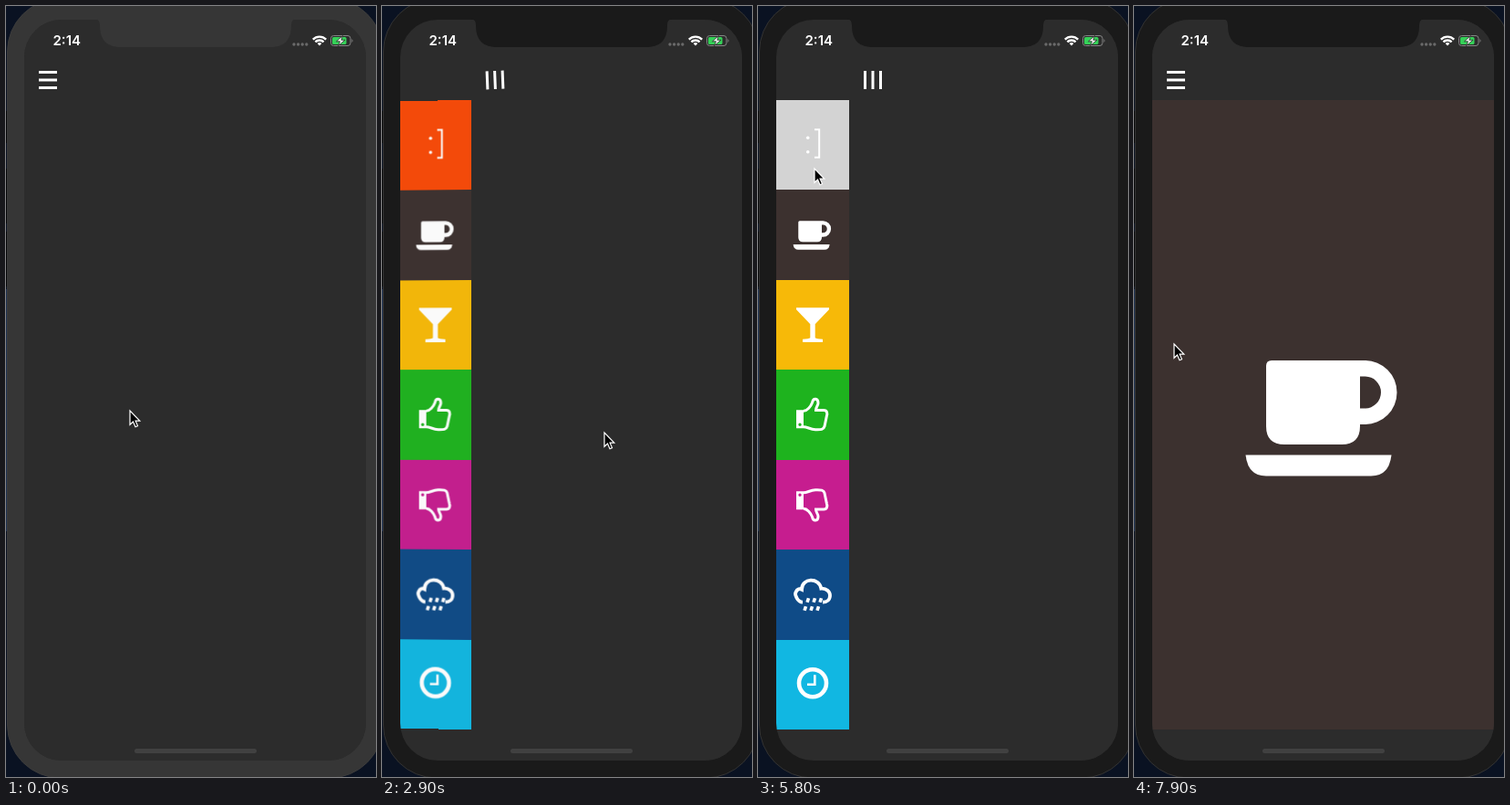
An HTML page for the animation above (8000 ms loop, 406 by 844 pixels).

```html
<!DOCTYPE html>
<html lang="en">
<head>
<meta charset="utf-8">
<title>Folding side menu</title>
<style>
html, body { margin: 0; width: 100%; height: 100%; overflow: hidden; background: #0a1222; }
body > svg, #screen, #menu, #detail, #pane { position: absolute; }
body > svg { left: 0; top: 0; width: 406px; height: 844px; }
#screen { left: 20px; top: 15px; width: 375px; height: 811px; border-radius: 41px; overflow: hidden; background: #2c2c2c; }
#menu { left: 0; top: 88px; width: 80px; height: 689px; transform-origin: 100% 50%; }
#menu div { height: calc(100% / 7); }
#menu svg { display: block; width: 80px; height: 100%; }
#detail { left: 0; top: 0; width: 375px; height: 811px; background: #2c2c2c; }
#pane { left: 0; top: 88px; width: 375px; height: 689px; }
#pane svg { position: absolute; left: 27.5px; top: 147.5px; width: 320px; height: 394px; }
.icon { fill: #fff; stroke: #fff; stroke-width: 0; }
.icon .line { fill: none; stroke-width: 3; }
</style>
</head>
<body>
<svg viewBox="0 0 406 844">
  <path d="M0 310H2V575H0Z" fill="#1d3150"/>
  <path d="M0 115H2V150H0ZM0 178H2V238H0ZM0 247H2V307H0Z" fill="#050608"/>
  <rect id="bezel" x="1.5" y="-8" width="412" height="853" rx="58"/>
</svg>
<div id="screen">
  <div id="menu"></div>
  <div id="detail"><div id="pane"></div></div>
</div>
<svg viewBox="0 0 406 844">
  <path id="notch" d="M98 14Q103 15 103 21C103 38 111 45 127 45H289C305 45 313 38 313 21Q313 15 318 14Z"/>
  <text x="51.5" y="43" fill="#fff" font-family="Inter, sans-serif" font-size="15" font-weight="600" textLength="auto">2:14</text>
  <path d="M316 42H331" stroke="#6a6a6a" stroke-width="3.4" stroke-linecap="round" stroke-dasharray="0 4.6"/>
  <g fill="none" stroke="#fff" stroke-width="2.3">
    <path d="M336.8 36.6A10 10 0 0 1 351.2 36.6M339.4 39.4A6.5 6.5 0 0 1 348.6 39.4"/>
    <path d="M341.6 41L344 43.6L346.4 41Q344 39.2 341.6 41Z" fill="#fff" stroke="none"/>
  </g>
  <rect x="356.5" y="32.5" width="21.5" height="11" rx="3" fill="none" stroke="#858585"/>
  <path d="M379.5 36Q381.5 38 379.5 40Z" fill="#858585"/>
  <rect x="358" y="34" width="15.5" height="8" rx="1.6" fill="#35d158"/>
  <path d="M369.5 32.5L362.5 38.8H366.5L364.5 43.6L372 37.2H367.8Z" fill="#fff" stroke="#222" stroke-width=".8"/>
  <rect x="141" y="813" width="134" height="5" rx="2.5" fill="#414141"/>
  <path id="burger" d="M-10-8.5H10M-10 0H10M-10 8.5H10" stroke="#fff" stroke-width="3"/>
  <path id="cursor" d="M0 0V15.3L3.5 12L6 17.7L8.5 16.6L6.1 11.2H10.8Z" fill="#000" stroke="#fff" stroke-width="1.2"/>
</svg>
<script>
const $ = id => document.getElementById(id);
const thumb = `<path d="M-18-5H-10V15H-18ZM-14 9.3A1.7 1.7 0 0 0-14 12.7A1.7 1.7 0 0 0-14 9.3Z"/>
  <path class="line" d="M-10-4C-6-4-2-9-.5-13C.5-18.5 6-18 6-12.5C6-10 3.5-8 3.5-4.7H12C16-4.7 16.4-1 15.3 2L13 13C12 17 8 16.5 3 16.5C-3 16-6 13.5-10 13.5"/>`;
const items = [
  ["#f84a08", `<circle cx="-5.3" cy="-8" r="1.8"/><circle cx="-5.3" cy="7.5" r="1.8"/>
    <path class="line" style="stroke-width:2" d="M2-17H7.2V13.5H2"/>`],
  ["#3c312f", `<g transform="scale(.25)"><path d="M-57-60H45.5A35 35 0 0 1 45.5 10H40V12Q40 32 20 32H-43Q-63 32-63 12V-54Q-63-60-57-60Z
    M40-42.5V-7.5H45.5A17.5 17.5 0 0 0 45.5-42.5Z" fill-rule="evenodd"/>
    <path d="M-85.5 43.5H74.5Q72 66.5 52 66.5H-63Q-83 66.5-85.5 43.5Z"/></g>`],
  ["#f7b908", `<path d="M-18-19H18V-17L2.7-1V14Q4 15.3 11 15.5V18.7H-11V15.5Q-4 15.3-2.7 14V-1L-18-17Z"/>`],
  ["#1eb31e", thumb],
  ["#c61d8f", `<g transform="scale(1 -1)">${thumb}</g>`],
  ["#0f4b87", `<path class="line" style="stroke-width:3.8" d="M-11 8.5C-17 8.5-20-.5-18.5-2.5C-17-6.5-14-6.5-12-5.5C-12-18.5 7-19 9.3-6.5C15-7 19-3 19 1C19 6 15 8.5 11 8.5"/>
    <path class="line" style="stroke-width:3.6" d="M-4.5 4L-6 8.5M2.5 4L1 8.5M9.5 4L8 8.5M-7.5 13L-9 17.5M-.5 13L-2 17.5M6.5 13L5 17.5"/>`],
  ["#11b7e2", `<circle class="line" style="stroke-width:4.6" cy="-2" r="15"/><path class="line" style="stroke-width:2.6" d="M2.3-11V-.5H-6"/>`]
];
const icon = i => `<svg class="icon" viewBox="-40 -49.2 80 98.4">${items[i][1]}</svg>`;
const cells = items.map((item, i) => {
  const cell = document.createElement("div");
  cell.innerHTML = icon(i);
  $("menu").append(cell);
  return cell;
});

// Tracks: [time, ...values], eased between keys.
const openKeys = [[0, 0], [650, 0], [1500, .775], [2200, .93], [2900, .975], [3300, .95], [4200, .2125],
  [4900, 1], [6920, 1], [7200, .81], [7620, 0]];
const cursorKeys = [[0, 136, 443], [500, 136, 443], [1500, 215, 458], [2900, 244, 467], [3300, 243, 469], [4200, 201, 474],
  [4800, 240, 474], [5600, 62, 178], [5950, 62, 178], [6300, 62, 250], [6480, 64, 252],
  [6900, 192, 346], [7200, 166, 354], [7650, 44, 370]];

function track(keys, t) {
  const n = keys.findIndex(k => k[0] > t);
  if (n < 0) return keys.at(-1).slice(1);
  const a = keys[n - 1], b = keys[n];
  const u = (t - a[0]) / (b[0] - a[0]), e = u * u * (3 - 2 * u);
  return a.slice(1).map((v, i) => v + (b[i + 1] - v) * e);
}

// Grey highlight while pressed, fading after release.
function press(i, t, down, up) {
  const k = t < down ? 0 : t < up ? 1 : Math.max(0, 1 - (t - up) / 350);
  cells[i].style.background = `color-mix(in srgb, #d3d3d3 ${k * 100}%, ${items[i][0]})`;
}

let shown;
function show(i) {
  if (i === shown) return;
  shown = i;
  $("pane").style.background = i < 0 ? "none" : items[i][0];
  $("pane").innerHTML = i < 0 ? "" : icon(i);
}

cells.forEach((c, i) => c.style.background = items[i][0]);

function draw(now) {
  const t = now % 8000;
  const [open] = track(openKeys, t), [x, y] = track(cursorKeys, t);
  const fold = 1 - open, shift = 80 * open;
  $("menu").style.opacity = open;
  $("menu").style.transform = `translateX(${shift - 80 + 19 * fold}px) perspective(1000px) rotateY(${-90 * fold}deg)`;
  $("detail").style.transform = `translateX(${shift}px)`;
  $("burger").setAttribute("transform", `translate(${46 + shift} 81) rotate(${90 * open})`);
  $("cursor").setAttribute("transform", `translate(${x} ${y})`);
  const idle = t < 500;
  $("bezel").setAttribute("fill", idle ? "#363636" : "#1a1a1a");
  $("bezel").setAttribute("stroke", idle ? "#3c3c3c" : "#333");
  $("notch").setAttribute("fill", idle ? "#363636" : "#1a1a1a");
  press(0, t, 5680, 5900);
  press(1, t, 6350, 6480);
  show(t < 5900 ? -1 : t < 6480 ? 0 : 1);
  requestAnimationFrame(draw);
}
requestAnimationFrame(draw);
</script>
</body>
</html>
```
